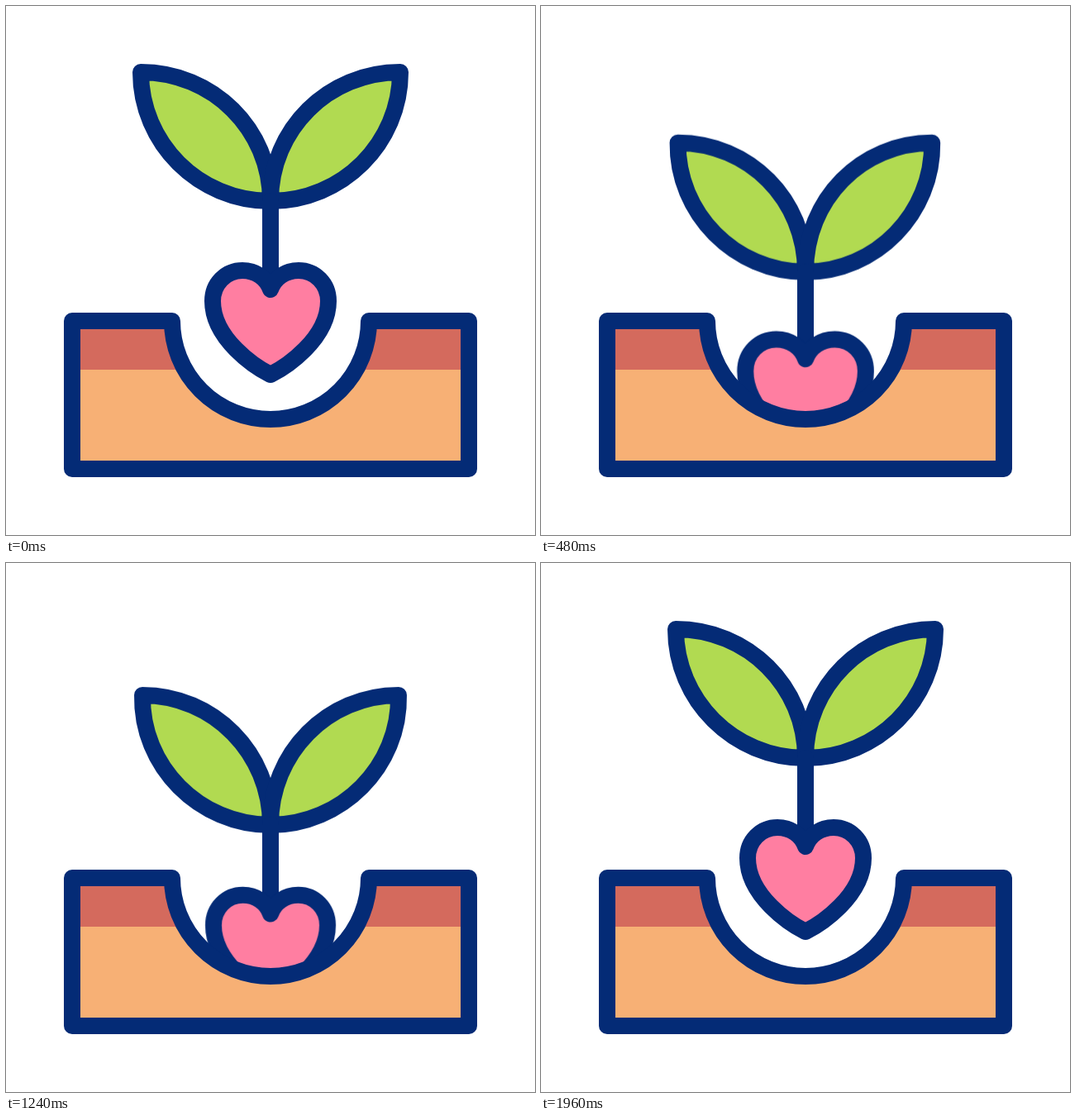
Write an HTML page that moves like this. It is 640x640 px and loops after 2000 ms.

```html
<!DOCTYPE html>
<html lang="en">
<head>
<meta charset="utf-8">
<title>Planting a heart</title>
<style>
html, body { margin: 0; width: 100%; height: 100%; overflow: hidden; background: #fff; }
svg { display: block; width: 100vw; height: 100vh; }
.line { stroke: #042b76; stroke-width: 20; stroke-linecap: round; stroke-linejoin: round; }
.plant, .heart, .left, .right { animation: 2s linear infinite; }
.plant { animation-name: hop; }
.heart { animation-name: beat; vector-effect: non-scaling-stroke; }
.left { animation-name: left; }
.right { animation-name: right; }

@keyframes hop {
  0% { transform: translateY(0); animation-timing-function: cubic-bezier(.37, 0, .6, .97); }
  16% { transform: translateY(84px); animation-timing-function: ease-out; }
  28%, 32% { transform: translateY(86px); animation-timing-function: ease-in-out; }
  40% { transform: translateY(85px); }
  50% { transform: translateY(85px); animation-timing-function: cubic-bezier(.6, 0, .9, .4); }
  62% { transform: translateY(81px); animation-timing-function: cubic-bezier(.4, .12, .7, .55); }
  70% { transform: translateY(24px); animation-timing-function: cubic-bezier(.33, .47, .6, 1); }
  75.5% { transform: translateY(-20px); animation-timing-function: cubic-bezier(.5, 0, .7, .6); }
  78% { transform: translateY(-13px); animation-timing-function: cubic-bezier(.2, .6, .3, 1); }
  98%, 100% { transform: translateY(0); }
}

@keyframes beat {
  0% { transform: scale(1); animation-timing-function: ease-in; }
  16% { transform: scale(1.014); animation-timing-function: ease-out; }
  28% { transform: scale(1.045); }
  32% { transform: scale(1.043); animation-timing-function: ease-in-out; }
  40% { transform: scale(.983); }
  50% { transform: scale(.983); animation-timing-function: cubic-bezier(.6, 0, .9, .4); }
  62% { transform: scale(.986); animation-timing-function: cubic-bezier(.4, .12, .7, .55); }
  70% { transform: scale(1.03); animation-timing-function: cubic-bezier(.33, .47, .6, 1); }
  75.5% { transform: scale(1.055); animation-timing-function: cubic-bezier(.5, 0, .7, .6); }
  78% { transform: scale(1.043); animation-timing-function: cubic-bezier(.2, .6, .3, 1); }
  98%, 100% { transform: scale(1); }
}

/* leaves fold while the plant moves and open again at rest */
@keyframes left {
  0% { d: path("M0 0C-87 0 -157 -70 -157 -156C-70 -156 0 -87 0 0Z"); animation-timing-function: ease-in-out; }
  10% { d: path("M0 0C-70 0 -140 -84 -128 -160C-52 -157 0 -95 0 0Z"); animation-timing-function: ease-in-out; }
  16% { d: path("M0 0C-76 0 -148 -78 -140 -158C-60 -156 0 -92 0 0Z"); animation-timing-function: ease-out; }
  28%, 50% { d: path("M0 0C-87 0 -157 -70 -157 -156C-70 -156 0 -87 0 0Z"); animation-timing-function: cubic-bezier(.6, 0, .9, .4); }
  62% { d: path("M0 0C-86 0 -157 -71 -155 -157C-69 -157 0 -87 0 0Z"); animation-timing-function: cubic-bezier(.4, .12, .7, .55); }
  70% { d: path("M0 0C-74 0 -152 -82 -137 -168C-58 -164 0 -95 0 0Z"); animation-timing-function: cubic-bezier(.33, .47, .6, 1); }
  75.5% { d: path("M0 0C-66 0 -148 -89 -123 -175C-50 -168 0 -101 0 0Z"); animation-timing-function: cubic-bezier(.5, 0, .7, .6); }
  78% { d: path("M0 0C-70 0 -150 -85 -130 -171C-54 -166 0 -98 0 0Z"); animation-timing-function: cubic-bezier(.2, .6, .3, 1); }
  98%, 100% { d: path("M0 0C-87 0 -157 -70 -157 -156C-70 -156 0 -87 0 0Z"); }
}

@keyframes right {
  0% { d: path("M0 0C87 0 157 -70 157 -156C70 -156 0 -87 0 0Z"); animation-timing-function: ease-in-out; }
  10% { d: path("M0 0C70 0 128 -84 118 -159C44 -159 0 -95 0 0Z"); animation-timing-function: ease-in-out; }
  16% { d: path("M0 0C76 0 140 -78 132 -157C54 -157 0 -92 0 0Z"); animation-timing-function: ease-out; }
  28%, 50% { d: path("M0 0C87 0 157 -70 157 -156C70 -156 0 -87 0 0Z"); animation-timing-function: cubic-bezier(.6, 0, .9, .4); }
  62% { d: path("M0 0C86 0 157 -71 155 -157C69 -157 0 -87 0 0Z"); animation-timing-function: cubic-bezier(.4, .12, .7, .55); }
  70% { d: path("M0 0C74 0 143 -82 133 -167C54 -167 0 -95 0 0Z"); animation-timing-function: cubic-bezier(.33, .47, .6, 1); }
  75.5% { d: path("M0 0C66 0 133 -89 117 -174C45 -173 0 -101 0 0Z"); animation-timing-function: cubic-bezier(.5, 0, .7, .6); }
  78% { d: path("M0 0C70 0 138 -85 125 -170C50 -170 0 -98 0 0Z"); animation-timing-function: cubic-bezier(.2, .6, .3, 1); }
  98%, 100% { d: path("M0 0C87 0 157 -70 157 -156C70 -156 0 -87 0 0Z"); }
}
</style>
</head>
<body>
<svg viewBox="0 0 640 640">
  <g class="plant">
    <g transform="translate(320 236)" fill="#b1da51">
      <path class="line left" d="M0 0C-87 0 -157 -70 -157 -156C-70 -156 0 -87 0 0Z"/>
      <path class="line right" d="M0 0C87 0 157 -70 157 -156C70 -156 0 -87 0 0Z"/>
      <path class="line" d="M0 0V105"/>
    </g>
    <g transform="translate(320 383)">
      <path class="line heart" fill="#ff7ea1" d="M0 -40C-5 -54 -18 -63 -34 -63C-54 -63 -70 -47 -70 -26C-70 20 -18 54 0 63C18 54 70 20 70 -26C70 -47 54 -63 34 -63C18 -63 5 -54 0 -40Z"/>
    </g>
  </g>
  <path fill="#f7b075" d="M80 381H201A119 119 0 0 0 439 381H560V560H80Z"/>
  <path fill="#d46a5d" d="M80 381H201A119 119 0 0 0 216.7 440H80ZM560 381H439A119 119 0 0 1 423.3 440H560Z"/>
  <path class="line" fill="none" d="M80 381H201A119 119 0 0 0 439 381H560V560H80Z"/>
</svg>
</body>
</html>
```
